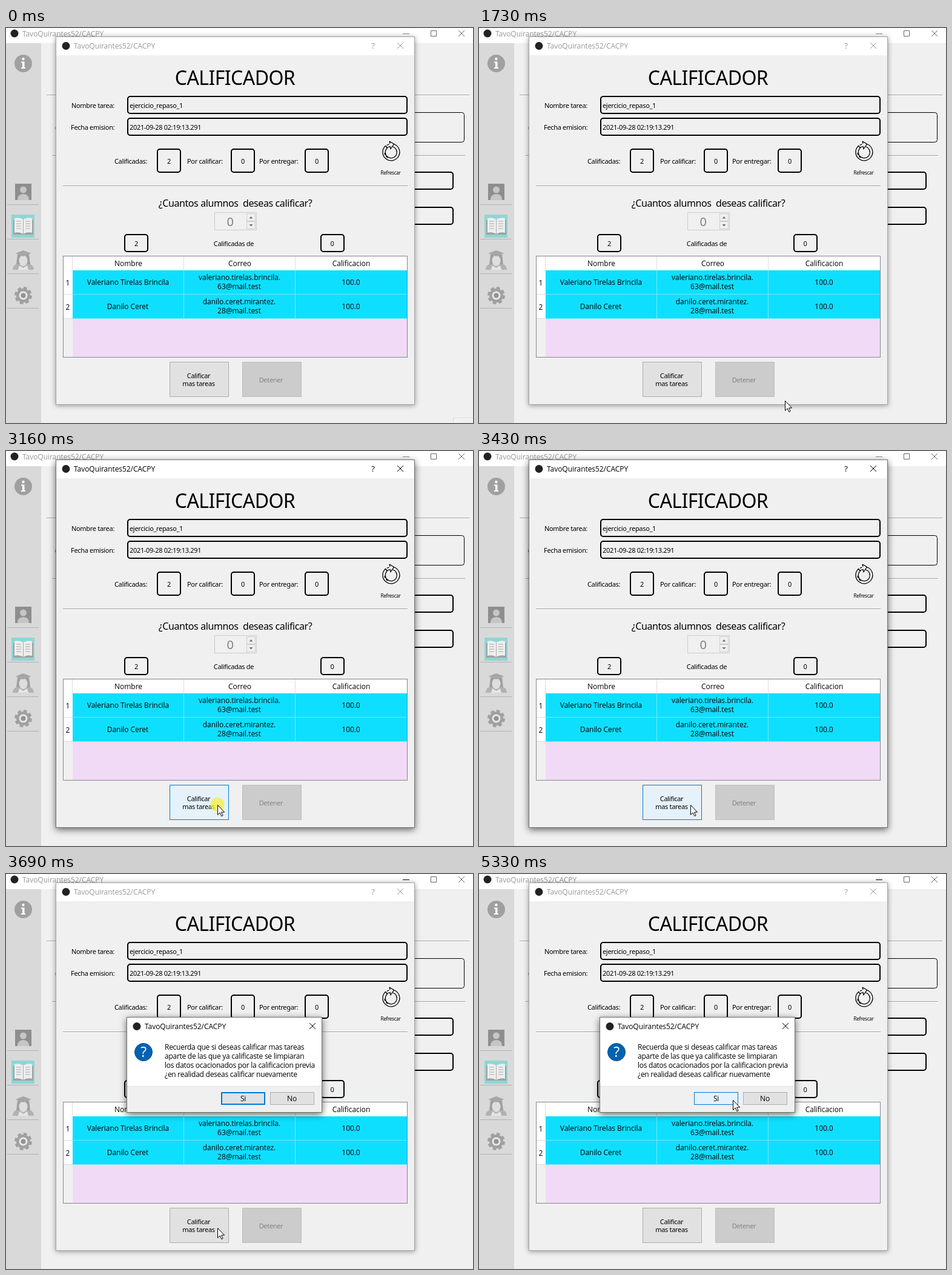
Animation of 771x652 px, one loop 8 s. Source, as an HTML page:

```html
<!DOCTYPE html>
<html lang="es">
<head>
<meta charset="utf-8">
<title>Calificador</title>
<style>
  html, body { margin: 0; width: 100%; height: 100%; overflow: hidden; background: #f0f0f0; }
  svg { display: block; width: 771px; height: 652px; }
  text { font: 11px "Noto Sans", sans-serif; letter-spacing: -.03em; white-space: pre; }
  .ui text, text.ui { font: 12px "Open Sans", "Noto Sans", sans-serif; letter-spacing: -.005em; }
  .message text { letter-spacing: -.022em; }
  .mid { text-anchor: middle; }
  .box { fill: none; stroke: #000; stroke-width: 2; }
  .button { fill: #e1e1e1; stroke: #adadad; }
  .hover { fill: #e5f1fb; stroke: #0078d7; }
  .rule { fill: none; stroke: #a0a0a0; }
  .glyph { fill: none; stroke: currentColor; }
  .backing { fill: #f0f0f0; stroke: #a4a4a4; filter: drop-shadow(0 1px 4px #0006); }
  .active .backing { stroke: #707070; filter: drop-shadow(0 3px 6px #0009); }
  #windowBar { color: #999; }
  .active #windowBar { color: #000; }
  #windowBar text, #message .bar text { fill: currentColor; }
</style>
</head>
<body>
<svg viewBox="0 0 771 652">
  <!-- main window -->
  <rect width="771" height="652" fill="#f0f0f0"/>
  <rect width="771" height="25" fill="#fff"/>
  <rect y="25" width="58" height="627" fill="#d9d9d9"/>
  <circle cx="14" cy="9" r="6.5" fill="#222"/>
  <text class="ui" x="27" y="14" fill="#999">TavoQuirantes52/CACPY</text>
  <path id="minimize" d="M655 9.5h11" stroke="#888"/>
  <path d="M701.500 4.500h9v9h-9zM747 4l10 10m0-10l-10 10" fill="none" stroke="#666"/>
  <path class="rule" d="M67 110.500H765M76 210.500H758"/>
  <path d="M67 111.500H765M76 211.500H758" stroke="#fff"/>
  <rect x="600.500" y="139.500" width="156" height="49" rx="4" fill="none" stroke="#000"/>
  <rect class="box" x="600" y="238" width="138" height="28" rx="4"/>
  <rect class="box" x="600" y="296" width="138" height="28" rx="4"/>
  <path id="accent" d="M83 160q-3 5 0 10" fill="none" stroke="#888"/>
  <path id="bubble" d="M771 643.500H738.500V652" fill="#f3f3f3" stroke="#dedede"/>

  <!-- sidebar -->
  <path d="M2 291.500h52m-52 57h52m-52 57h52m-52 57h52" stroke="#b2b2b2"/>
  <g fill="#a0a0a0">
    <circle cx="28.500" cy="58.500" r="14.500"/>
    <path d="M25 55.500h5.500V65H32v2h-7v-2h2v-7.500h-2z" fill="#fff"/>
    <circle cx="28.500" cy="51" r="2.200" fill="#fff"/>

    <rect x="15" y="257" width="27" height="27" fill="#8e8e8e"/>
    <circle cx="28.500" cy="267" r="5.500" fill="#c6c6c6"/>
    <path d="M19 284q0-10 9.500-10t9.500 10z" fill="#c6c6c6"/>

    <rect x="9" y="308" width="38" height="38" fill="#8ed6d5"/>
    <path d="M12 317h33v24H12z"/>
    <path d="M14 314q8-2 14.500 2q6.500-4 14.500-2v24q-8-2-14.500 2q-6.500-4-14.500-2z" fill="#eee"/>
    <path d="M28.500 316v24M17 319h8m-8 4h8m-8 4h8m-8 4h8m7-12h8m-8 4h8m-8 4h8m-8 4h8" stroke="#aaa"/>

    <path d="M11 399q0-9 10-10h15q10 1 10 10z" fill="#b2b2b2"/>
    <path d="M19 374h19l2 16h-23z"/>
    <path d="M22 392l6.500 4 6.500-4 2 7H20z" fill="#e6e6e6"/>
    <ellipse cx="28.500" cy="384" rx="7" ry="9" fill="#dedede"/>
    <path d="M28.500 367l13 5-13 5-13-5z" fill="#a6a6a6"/>

    <circle cx="28.500" cy="441.500" r="12" fill="none" stroke="#a0a0a0" stroke-width="5" stroke-dasharray="5.425 4"/>
    <circle cx="28.500" cy="441.500" r="11.500"/>
    <circle cx="28.500" cy="441.500" r="7" fill="#e8e8e8"/>
    <circle cx="28.500" cy="441.500" r="4" fill="#929292"/>
  </g>

  <!-- grading window -->
  <g id="grader">
    <rect class="backing" x="82.500" y="14.500" width="592" height="607"/>
    <rect x="83" y="15" width="591" height="30" fill="#fff"/>
    <circle cx="99" cy="29.500" r="6.500" fill="#222"/>
    <g id="windowBar" class="ui">
      <text x="112" y="34">TavoQuirantes52/CACPY</text>
      <text class="mid" x="606" y="34" style="font-size:13px">?</text>
      <path class="glyph" d="M646 24l10 10m0-10l-10 10"/>
    </g>

    <text class="mid" x="378" y="94" style="font-size:32px;letter-spacing:-.018em">CALIFICADOR</text>
    <text x="108" y="132">Nombre tarea:</text>
    <text x="107" y="168">Fecha emision:</text>
    <rect class="box" x="201" y="113" width="461" height="28" rx="4"/>
    <rect class="box" x="201" y="149" width="461" height="28" rx="4"/>
    <text x="204" y="132">ejercicio_repaso_1</text>
    <text x="204" y="168">2021-09-28 02:19:13.291</text>

    <text x="179" y="224">Calificadas:</text>
    <text x="299" y="224">Por calificar:</text>
    <text x="418" y="224">Por entregar:</text>
    <rect class="box" x="250" y="200" width="38" height="38" rx="4"/>
    <rect class="box" x="372" y="200" width="38" height="38" rx="4"/>
    <rect class="box" x="494" y="200" width="38" height="38" rx="4"/>
    <g class="mid">
      <text x="269" y="224">2</text><text x="391" y="224">0</text><text x="513" y="224">0</text>
    </g>
    <g fill="none" stroke="#000" stroke-width="1.300">
      <path d="M640 191.500A14 14 0 1 1 626.500 194.500L629.500 198A9.500 9.500 0 1 0 638.500 196"/>
      <path d="M633 187l7.500 4.500-5.500 8-1-4-6 2"/>
      <path d="M633 187l1 4-7.500 3.500M625 206a10.500 10.500 0 0 0 5 8" stroke-dasharray="4 2"/>
    </g>
    <text class="mid" x="635" y="242" style="font-size:8px">Refrescar</text>
    <path class="rule" d="M94 260.500H663"/>
    <path d="M94 261.500H663" stroke="#fff"/>

    <text class="mid" x="378.500" y="295" style="font-size:16px;letter-spacing:-.025em">¿Cuantos alumnos  deseas calificar?</text>
    <path d="M344.500 304.500h69v29h-69zM397.500 306.500h14v12h-14zm0 13h14v12h-14z" fill="none" stroke="#ccc"/>
    <path d="M401.500 314.500l3-3.500 3 3.500zm0 9.500h6l-3 3.500z" fill="#707070"/>
    <text class="mid" x="370" y="327" fill="#808080" style="font-size:20px">0</text>
    <rect class="box" x="196" y="341" width="38" height="28" rx="4"/>
    <rect class="box" x="520" y="341" width="38" height="28" rx="4"/>
    <g class="mid">
      <text x="215" y="360">2</text><text x="376" y="360">Calificadas de</text><text x="538.500" y="360">0</text>
    </g>

    <rect x="94.500" y="376.500" width="568" height="167" fill="#f0daf6" stroke="#828790"/>
    <path d="M95 377h567v23H95zM95 400h15v80H95z" fill="#fff"/>
    <path d="M95 480h15v63H95z" fill="#f0f0f0"/>
    <path d="M110 400h552v80H110z" fill="#0fdfff"/>
    <path d="M109.500 377v23M293.500 377v23M477.500 377v23M95 439.500h15M95 479.500h15" stroke="#dcdcdc"/>
    <path d="M293.500 400v80M477.500 400v80M110 439.500h552M110 479.500h552" stroke="#6deaff"/>
    <g class="ui mid">
      <text x="202" y="393">Nombre</text><text x="386" y="393">Correo</text><text x="570" y="393">Calificacion</text>
      <text x="102" y="425">1</text><text x="102" y="465">2</text>
      <text x="201.500" y="424">Valeriano Tirelas Brincila</text>
      <text x="385.500" y="416">valeriano.tirelas.brincila.</text>
      <text x="385" y="431">63@mail.test</text>
      <text x="569.500" y="424">100.0</text>
      <text x="201" y="464">Danilo Ceret</text>
      <text x="385" y="456">danilo.ceret.mirantez.</text>
      <text x="385" y="471">28@mail.test</text>
      <text x="569.500" y="464">100.0</text>
    </g>

    <rect id="gradeButton" class="button" x="270.500" y="551.500" width="97" height="57"/>
    <rect x="390.500" y="551.500" width="97" height="57" fill="#ccc" stroke="#bfbfbf"/>
    <g class="mid">
      <text x="318" y="578">Calificar</text><text x="318" y="591">mas tareas</text>
      <text x="437.500" y="585" fill="#838383">Detener</text>
    </g>
  </g>

  <!-- confirmation box -->
  <g id="message" class="ui message active">
    <rect class="backing" x="199.500" y="236.500" width="322" height="157"/>
    <rect x="200" y="237" width="321" height="113" fill="#fff"/>
    <circle cx="216" cy="251.500" r="6.500" fill="#222"/>
    <g class="bar">
      <text x="229" y="256" style="letter-spacing:-.005em">TavoQuirantes52/CACPY</text>
      <path class="glyph" d="M501 246l10 10m0-10l-10 10"/>
    </g>
    <circle cx="227" cy="294" r="14.500" fill="#0063b1" stroke="#004d8c"/>
    <text class="mid" x="227" y="302" fill="#fff" style="font-size:23px">?</text>
    <text x="262" y="290">Recuerda que si deseas calificar mas tareas</text>
    <text x="262" y="305">aparte de las que ya calificaste se limpiaran</text>
    <text x="262" y="320">los datos ocacionados por la calificacion previa</text>
    <text x="262" y="335">¿en realidad deseas calificar nuevamente</text>
    <path d="M200 350.500h321" stroke="#dfdfdf"/>
    <rect x="355" y="360" width="73" height="21" fill="#0078d7"/>
    <rect id="yesFace" x="357" y="362" width="69" height="17" fill="#e1e1e1"/>
    <rect class="button" x="436.500" y="360.500" width="72" height="20"/>
    <g class="mid"><text x="391.500" y="375">Si</text><text x="472" y="375">No</text></g>
  </g>

  <!-- pointer -->
  <circle id="press" cx="349" cy="583.500" r="11.500" fill="#f4ee3c" opacity=".75"/>
  <path id="arrow" d="M.5.5v16l3.700-3.500 2.600 5.700 2.300-1-2.500-5.600h5z" fill="#fff" stroke="#000"/>
  <path id="resize" d="M529.500 617.500l4 4.500h-3v13h3l-4 4.500-4-4.500h3v-13h-3z" fill="#fff" stroke="#000"/>
</svg>
<script>
const DURATION = 8000;
const PRESS = 3160, RELEASE = 3290, OPEN = 3484;
const el = Object.fromEntries([...document.querySelectorAll("[id]")].map(e => [e.id, e]));

const moves = [
  { from: 1064, to: 1264, path: [[568, 638], [551, 632], [538, 627], null] },
  { from: 1730, to: 2060, path: [[505, 615], [458, 604], [408, 594], [373, 588], [355, 585], [349, 584]] },
  { from: 4420, to: 5200, path: [[356, 573], [382, 535], [408, 490], [428, 456], [440, 430], [442, 416],
    [440, 406], [436, 398], [431, 390], [426, 383], [422, 378], [419, 374], [418, 373]] },
  { from: 5330, to: 5331, path: [[419, 373], [419, 373]] }
];
const openSteps = [.35, .78, .95, 1];

const show = (node, visible) => node.style.display = visible ? "" : "none";
const inside = (p, x, y, w, h) => p && p[0] >= x && p[0] < x + w && p[1] >= y && p[1] < y + h;

function pointerAt(t) {
  const move = moves.findLast(m => t >= m.from);
  if (!move) return null;
  const last = move.path.length - 1;
  const step = (move.to - move.from) / last;
  return move.path[Math.min(last, Math.floor((t - move.from) / step))];
}

function draw(t) {
  const pointer = pointerAt(t);
  const opened = t >= OPEN;
  const active = t >= PRESS && !opened;

  show(el.arrow, pointer);
  show(el.resize, !pointer && t >= moves[0].from);
  if (pointer) el.arrow.setAttribute("transform", `translate(${pointer})`);
  show(el.press, t >= PRESS && t < RELEASE);

  el.bubble.style.opacity = t < 600 ? 1 : t < 670 ? .6 : t < 1070 ? .3 : 0;
  el.grader.classList.toggle("active", active);
  el.gradeButton.classList.toggle("hover", !opened && !!inside(pointer, 270, 551, 98, 58));
  el.minimize.style.stroke = opened ? "#000" : "#888";
  el.accent.style.stroke = active ? "#b030d0" : opened ? "#a08060" : "#888";

  show(el.message, opened);
  if (opened) {
    const p = openSteps[Math.min(3, Math.floor((t - OPEN) / 66))];
    el.message.style.opacity = p;
    el.message.setAttribute("transform", `translate(360.5 315) scale(${.94 + .06 * p}) translate(-360.5 -315)`);
  }
  const yesHover = inside(pointer, 355, 360, 73, 21);
  const inset = yesHover ? 1 : 2;
  const face = { x: 355 + inset, y: 360 + inset, width: 73 - 2 * inset, height: 21 - 2 * inset,
    fill: yesHover ? "#e5f1fb" : "#e1e1e1" };
  for (const name in face) el.yesFace.setAttribute(name, face[name]);
}

const start = performance.now();
function tick() {
  draw((performance.now() - start) % DURATION);
  requestAnimationFrame(tick);
}
tick();
</script>
</body>
</html>
```
